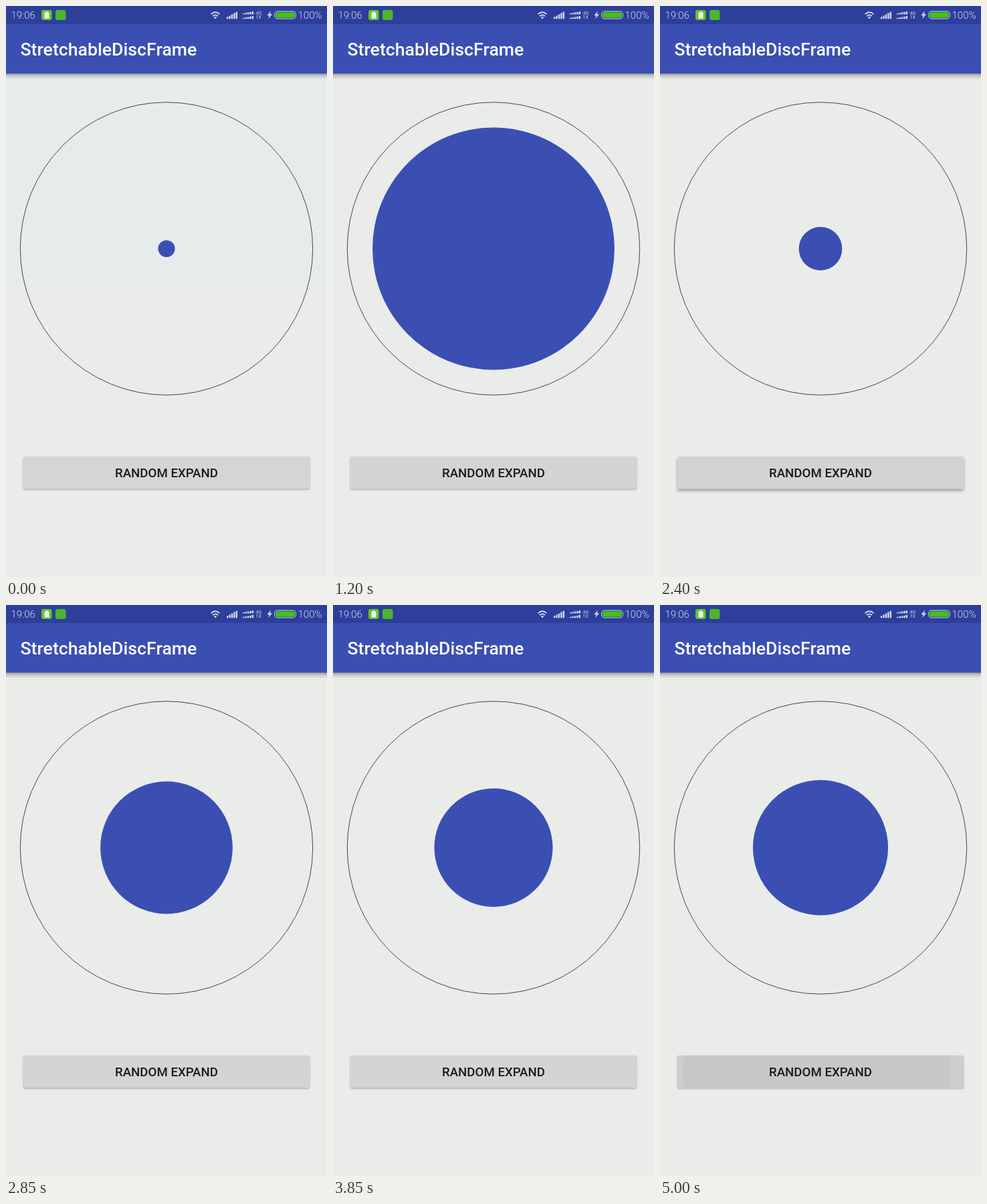
These frames come from a looping animation (480 by 853 pixels, 5.05 s). An HTML page:

```html
<!DOCTYPE html>
<html lang="en">
<head>
<meta charset="utf-8">
<style>
  html, body { margin: 0; width: 100%; height: 100%; overflow: hidden; background: #eaecea; }
  svg { display: block; width: 100vw; height: 100vh; font-family: Roboto, sans-serif; }
  .status { fill: #d3d8ee; }
  .clock { font-size: 15px; font-weight: 300; }
  .tiny { font-size: 7px; }
  .title { font-size: 26.67px; font-weight: 500; fill: #fff; }
  .label { font-size: 18.67px; font-weight: 500; fill: #191b19; text-anchor: middle; }
</style>
</head>
<body>
<svg viewBox="0 0 480 853">
  <defs>
    <linearGradient id="fall" x2="0" y2="1">
      <stop stop-color="#000" stop-opacity=".34"/>
      <stop offset=".45" stop-color="#000" stop-opacity=".13"/>
      <stop offset="1" stop-color="#000" stop-opacity="0"/>
    </linearGradient>
    <clipPath id="buttonClip"><rect x="26" y="673" width="428" height="48.500" rx="2.700"/></clipPath>
  </defs>

  <rect width="480" height="853" fill="#eaecea"/>
  <g id="tint">
    <rect y="101" width="480" height="325" fill="#e6ecec"/>
    <rect y="426" width="480" height="427" fill="#eceaec"/>
  </g>

  <rect y="101" width="480" height="9" fill="url(#fall)"/>
  <rect y="26" width="480" height="75" fill="#3b4fb3"/>
  <rect width="480" height="27" fill="#2d3e9b"/>
  <text class="title" x="21.500" y="74">StretchableDiscFrame</text>

  <g class="status">
    <text class="clock" x="7.500" y="19.300">19:06</text>
    <text class="clock" x="436.500" y="19.300">100%</text>
    <text class="tiny" x="373.500" y="12.500">4G</text>
    <text class="tiny" x="373.500" y="19.300">1X</text>
    <rect x="53" y="6" width="15.500" height="15" rx="3" fill="#5cc824"/>
    <path d="M57.500 9.800h2v-1.300h3v1.300h2v8.700h-7z" fill="#fff"/>
    <rect x="74" y="6" width="15.500" height="15" rx="3" fill="#4cb52c"/>
    <g fill="none" stroke="#d3d8ee" stroke-width="1.800">
      <path d="M306.500 12.300q6.500-6 13 0M309 15.200q4-3.600 8 0"/>
    </g>
    <path d="M310.700 16.800q2.300-1.600 4.600 0l-2.300 2.600z"/>
    <path id="bars"/>
    <path d="M396 7.500l-5.700 6.700h3.400l-1.700 5 6.300-7h-3.600z"/>
    <rect x="401.500" y="8" width="32" height="11" rx="4.500" fill="none" stroke="#d3d8ee"/>
    <rect x="403" y="9.500" width="29" height="8" rx="3.200" fill="#43c310"/>
  </g>

  <circle cx="240" cy="362.500" r="218.700" fill="none" stroke="#333" stroke-width=".9"/>
  <circle id="disc" cx="240" cy="362.500" fill="#3b4fb3"/>

  <rect id="button" x="26" y="673" width="428" height="48.500" rx="2.700" fill="#d3d5d2"/>
  <g clip-path="url(#buttonClip)">
    <rect id="shade" x="26" y="673" width="428" height="49" fill="#cdcfcc"/>
    <circle id="ripple" cx="234" cy="697" fill="#c7c9c6"/>
  </g>
  <text class="label" x="240" y="704">RANDOM EXPAND</text>
</svg>
<script>
const LOOP = 5050, STEP = 50, DURATION = 750, START_RADIUS = 12.6;
// [start time, radius reached]
const taps = [[518, 184.4], [1595, 32.4], [2400, 134], [3230, 85], [4060, 120], [4785, 20]];

const el = id => document.getElementById(id);
const set = (id, name, value) => el(id).setAttribute(name, value);
const ramp = (t, from, to) => Math.min(1, Math.max(0, (t - from) / (to - from)));
const pulse = (t, a, b, c, d) => ramp(t, a, b) * (1 - ramp(t, c, d));
const ease = p => (1 - Math.cos(Math.PI * p)) / 2;

function signalBars() {
  const bar = (x, y, w, h) => `M${x} ${y}h${w}v${-h}h${-w}z`;
  let d = '';
  for (let i = 0; i < 5; i++) {
    d += bar(330 + i * 3.4, 19.3, 2.4, 3 + i * 1.9);
    d += bar(354 + i * 3.4, 12.5, 2.5, 1.5 + i * 0.7);
    d += bar(354 + i * 3.4, 19.3, 2.5, 1.5 + i * 0.7);
  }
  return d;
}

function draw(t) {
  let radius = START_RADIUS, lift = 0, shade = 0, rippleRadius = 0, rippleAlpha = 0;
  for (const [start, target] of taps) {
    const dt = t - start;
    radius += (target - radius) * ease(ramp(dt, 0, DURATION));
    lift += pulse(dt, -80, 0, 50, 150);
    shade += pulse(dt, -20, 120, 300, 380);
    if (dt > 0 && dt < 280) {
      rippleRadius = 30 + dt * 0.79;
      rippleAlpha = pulse(dt, 0, 100, 240, 280);
    }
  }
  set('disc', 'r', radius);
  set('shade', 'opacity', shade);
  set('ripple', 'r', rippleRadius);
  set('ripple', 'opacity', rippleAlpha);
  set('button', 'fill', t < 550 ? '#d6d5d6' : '#d3d5d2');
  set('tint', 'opacity', t < 550 ? 1 : 0);
  el('button').style.filter =
    `drop-shadow(0 ${1.6 + lift * 1.9}px ${0.9 + lift * 1.3}px rgba(0,0,0,.32))`;
}

function frame(now) {
  draw(Math.floor(now % LOOP / STEP) * STEP);
  requestAnimationFrame(frame);
}

set('bars', 'd', signalBars());
draw(0);
requestAnimationFrame(frame);
</script>
</body>
</html>
```
